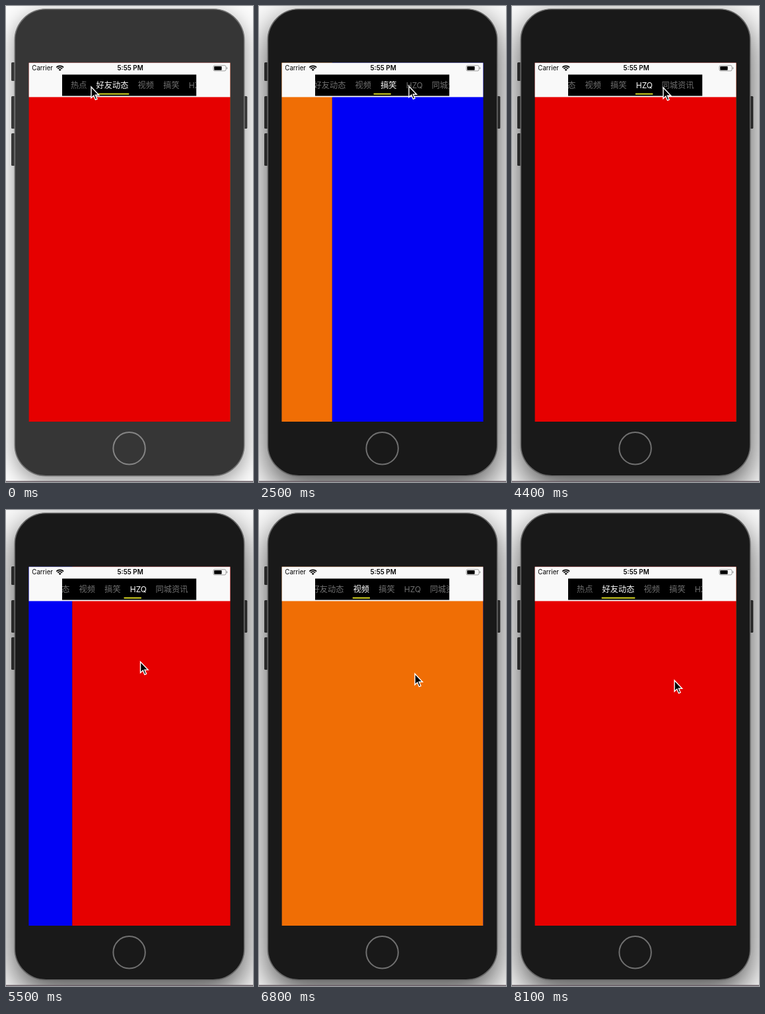
An HTML page with a canvas for the animation above (9.5 s loop, 374 px wide and 718 px high).

```html
<!DOCTYPE html>
<html lang="zh-CN">
<head>
<meta charset="utf-8">
<title>Tab strip</title>
<style>
html, body { margin: 0; width: 100%; height: 100%; overflow: hidden; background: #fff; }
canvas { display: block; width: 374px; height: 718px; }
</style>
</head>
<body>
<canvas id="stage"></canvas>
<script>
const W = 374, H = 718, LOOP = 9500, STEP = 100;
const canvas = document.getElementById('stage');
const ctx = canvas.getContext('2d');
const ratio = window.devicePixelRatio || 1;
canvas.width = W * ratio;
canvas.height = H * ratio;

const pageColors = ['#0000f5', '#e60000', '#f06e05'];
const screenBox = { x: 34.4, y: 85.4, w: 305.2, h: 541.6 };
const strip = { x: 85, y: 103.3, w: 203.4, h: 32.5 };
const FOCUS_TIME = 600;

const FONT = 12.2, GAP = 14.2, PADDING = 13;
let nextX = strip.x + PADDING;
const tabs = ['热点', '好友动态', '视频', '搞笑', 'HZQ', '同城资讯'].map(label => {
  const latin = /^[A-Z]+$/.test(label);
  const w = latin ? 24.6 : label.length * FONT;
  const tab = { label, latin, x: nextX, w };
  nextX += w + GAP;
  return tab;
});
const maxScroll = nextX - GAP + PADDING - strip.x - strip.w;

// Taps have only a start point; swipes also say where the drag ends.
const SCROLL = 300, DRAG = 330, FLICK = 400;
const gestures = [
  { at: 950, tab: 2, from: [206, 123] },
  { at: 2298, tab: 3, from: [226, 120] },
  { at: 3700, tab: 4, from: [228, 122] },
  { at: 5380, tab: 3, from: [177, 227], to: [262, 230] },
  { at: 6320, tab: 2, from: [154, 246], to: [235, 246] },
  { at: 7280, tab: 1, from: [164, 255], to: [245, 256] }
];

const mix = (a, b, k) => a + (b - a) * k;
const clamp = (v, lo, hi) => Math.max(lo, Math.min(hi, v));

function ease(t, start, end) {
  const u = clamp((t - start) / (end - start), 0, 1);
  return u * u * (3 - 2 * u);
}

function centred(tab) {
  return clamp(tab.x + tab.w / 2 - strip.x - strip.w / 2, 0, maxScroll);
}

function stateAt(t) {
  let page = 1, scroll = 0, selected = 1, cursor = [128, 121], free = 0;
  const glide = (point, k) => { cursor = cursor.map((v, i) => mix(v, point[i], k)); };
  for (const { at, tab, from, to } of gestures) {
    const settle = to ? at + FLICK : at;
    page = mix(page, tab, ease(t, at, at + (to ? FLICK : SCROLL)));
    scroll = mix(scroll, centred(tabs[tab]), ease(t, settle, settle + SCROLL));
    if (t >= settle) selected = tab;
    glide(from, ease(t, Math.max(free, at - 900), at - 200));
    if (to) glide(to, ease(t, at, at + DRAG));
    free = at + 500;
  }
  return { page, scroll, selected, cursor };
}

function rect(color, x, y, w, h) {
  ctx.fillStyle = color;
  ctx.fillRect(x, y, w, h);
}

function roundRect(x, y, w, h, r) {
  ctx.beginPath();
  ctx.roundRect(x, y, w, h, r);
}

function text(str, x, y, font, color, align = 'left') {
  ctx.font = font;
  ctx.fillStyle = color;
  ctx.textAlign = align;
  ctx.fillText(str, x, y);
}

function clipTo(box, draw) {
  ctx.save();
  ctx.beginPath();
  ctx.rect(box.x, box.y, box.w, box.h);
  ctx.clip();
  draw();
  ctx.restore();
}

function sideButton(x, y, h) {
  roundRect(x, y, 6, h, 1.5);
  ctx.fill();
}

function drawPhone(focused) {
  const body = focused ? '#191919' : '#363636';
  rect('#fcfcfc', 0, 0, W, H);

  ctx.save();
  ctx.shadowColor = focused ? 'rgba(0,0,0,.72)' : 'rgba(0,0,0,.42)';
  ctx.shadowBlur = (focused ? 50 : 32) * ratio;
  ctx.shadowOffsetY = (focused ? 17 : 9) * ratio;
  ctx.fillStyle = body;
  roundRect(13, 4.5, 348, 704.5, 47);
  ctx.fill();
  ctx.restore();

  ctx.fillStyle = focused ? '#282828' : '#363636';
  sideButton(8, 85, 28);
  sideButton(8, 136, 49);
  sideButton(8, 192, 49);
  sideButton(359.3, 136, 49);

  ctx.fillStyle = body;
  ctx.strokeStyle = focused ? '#686868' : '#747474';
  ctx.lineWidth = 1.6;
  roundRect(13.3, 4.8, 347.4, 703.9, 47);
  ctx.fill();
  ctx.stroke();

  ctx.strokeStyle = focused ? '#707070' : '#858585';
  ctx.lineWidth = 2;
  ctx.beginPath();
  ctx.arc(186.6, 667.3, 24.2, 0, Math.PI * 2);
  ctx.stroke();

  rect('#6a5f67', 0, 716.5, W, 1.5);
}

function drawStatusBar() {
  text('Carrier', 39.3, 97.4, '9.7px Inter, sans-serif', '#000');
  text('5:55 PM', 188.2, 97.4, '600 9.9px Inter, sans-serif', '#000', 'center');

  const cx = 81.7, cy = 98, from = -Math.PI * .75, to = -Math.PI * .25;
  ctx.strokeStyle = '#000';
  ctx.lineWidth = 1.8;
  for (const r of [4.8, 7.6]) {
    ctx.beginPath();
    ctx.arc(cx, cy, r, from, to);
    ctx.stroke();
  }
  ctx.fillStyle = '#000';
  ctx.beginPath();
  ctx.moveTo(cx, cy);
  ctx.arc(cx, cy, 2.8, from, to);
  ctx.fill();

  ctx.strokeStyle = '#888';
  ctx.lineWidth = .8;
  roundRect(314, 89.7, 19, 8.2, 2);
  ctx.stroke();
  ctx.fillStyle = '#000';
  roundRect(315.2, 90.9, 11.4, 5.8, .8);
  ctx.fill();
  rect('#888', 334.1, 92.4, 1, 2.8);
}

function drawStrip({ page, scroll, selected }) {
  rect('#000', strip.x, strip.y, strip.w, strip.h);
  const cjk = `300 ${FONT}px "Noto Sans CJK SC", "Noto Sans CJK", sans-serif`;
  tabs.forEach((tab, i) => {
    const font = tab.latin ? '12px Inter, sans-serif' : cjk;
    text(tab.label, tab.x - scroll, 123.5, font, i === selected ? '#fff' : '#707070');
  });
  const i = Math.floor(page), k = page - i;
  const a = tabs[i], b = tabs[i + 1];
  rect('#f5f52a', mix(a.x, b.x, k) - scroll - .9, 131.8, mix(a.w, b.w, k) + 1.8, 1.7);
}

function drawScreen(state) {
  const { x, y, w, h } = screenBox;
  clipTo(screenBox, () => {
    const first = Math.floor(state.page);
    for (const i of [first, first + 1]) {
      rect(pageColors[i % 3], x + (i - state.page) * w, y, w, h);
    }
    rect('#f9f9f9', x, y, w, 52);
    drawStatusBar();
    clipTo(strip, () => drawStrip(state));
  });
}

function drawCursor(x, y) {
  const arrow = [[0, 0], [0, 16.6], [3.8, 13.1], [6.4, 19.4], [9, 18.3], [6.4, 12.2], [11.6, 12.2]];
  ctx.save();
  ctx.translate(x + 1, y + 1);
  ctx.beginPath();
  arrow.forEach(p => ctx.lineTo(...p));
  ctx.closePath();
  ctx.lineWidth = 1.4;
  ctx.strokeStyle = '#fff';
  ctx.fillStyle = '#000';
  ctx.fill();
  ctx.stroke();
  ctx.restore();
}

function render(now) {
  const t = Math.floor((now % LOOP) / STEP) * STEP;
  const state = stateAt(t);
  ctx.setTransform(ratio, 0, 0, ratio, 0, 0);
  drawPhone(t >= FOCUS_TIME);
  drawScreen(state);
  drawCursor(...state.cursor);
}

let start;
function tick(now) {
  start ??= now;
  render(now - start);
  requestAnimationFrame(tick);
}
render(0);
requestAnimationFrame(tick);
</script>
</body>
</html>
```
